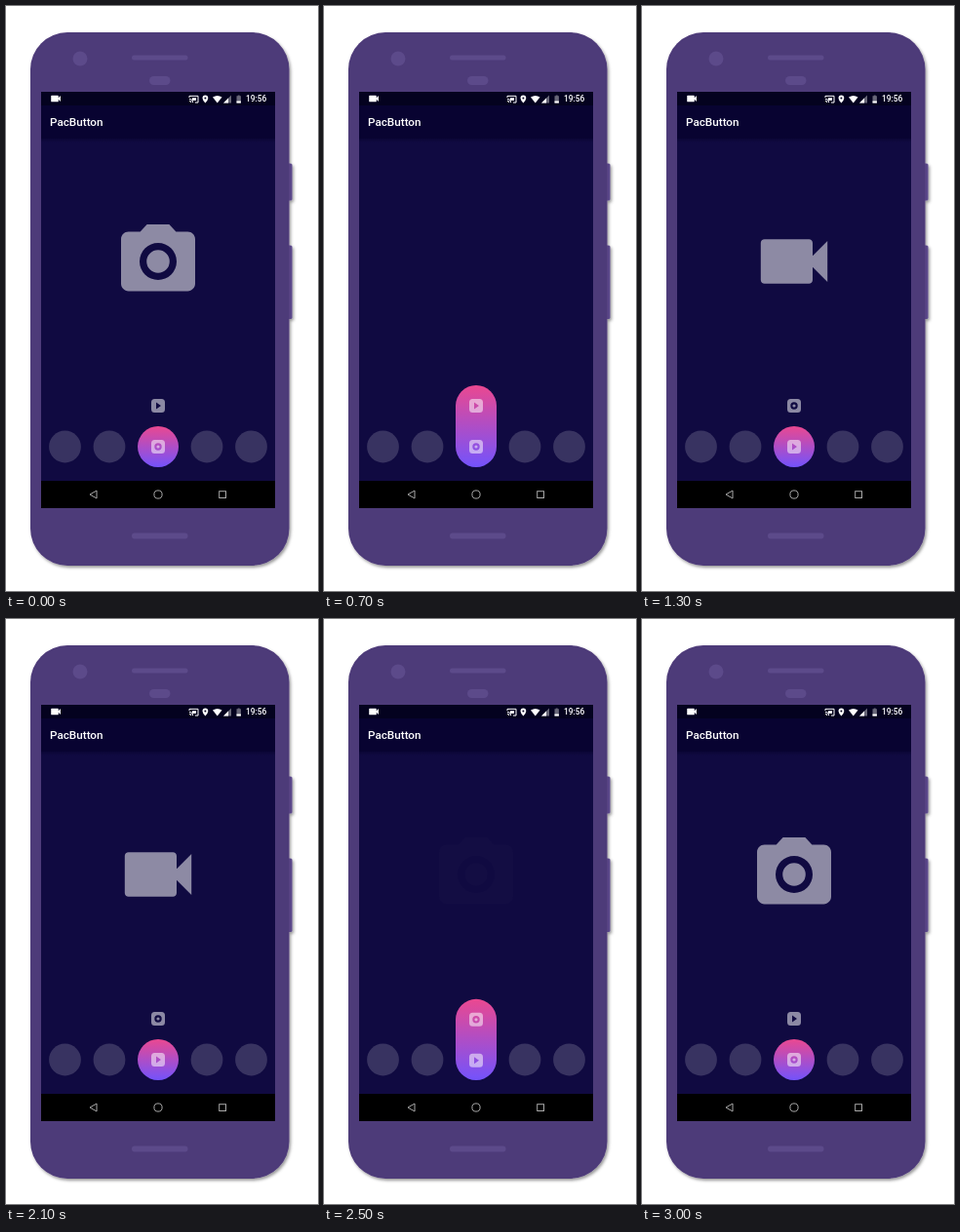
Write an HTML page that moves like this. It is 320x600 px and loops after 3700 ms.

```html
<!DOCTYPE html>
<html lang="en">
<head>
<meta charset="utf-8">
<title>PacButton</title>
<style>
  html, body { margin: 0; width: 100%; height: 100%; overflow: hidden; background: #fff; }
  svg { display: block; width: 320px; height: 600px; }
  text { font-family: Roboto, sans-serif; font-weight: 500; fill: #fff; }
  .glass { fill: #fff; fill-opacity: .52; fill-rule: evenodd; }
</style>
</head>
<body>
<svg viewBox="0 0 320 600">
  <defs>
    <linearGradient id="pink-violet" x2="0" y2="1">
      <stop stop-color="#ea4890"/><stop offset="1" stop-color="#7353fc"/>
    </linearGradient>
    <linearGradient id="bar-shadow" x2="0" y2="1">
      <stop stop-color="#050128" stop-opacity=".55"/><stop offset="1" stop-color="#050128" stop-opacity="0"/>
    </linearGradient>
    <filter id="shadow" x="-10%" y="-10%" width="120%" height="120%">
      <feDropShadow dx="1.5" dy="2" stdDeviation="1.8" flood-opacity=".4"/>
    </filter>
    <path id="camera" d="M9 2L7.17 4H4c-1.1 0-2 .9-2 2v12c0 1.1.9 2 2 2h16c1.1 0 2-.9 2-2V6c0-1.1-.9-2-2-2h-3.17L15 2H9zm3 15a5 5 0 1 1 0-10a5 5 0 1 1 0 10zm0-1.9a3.1 3.1 0 1 0 0-6.2a3.1 3.1 0 1 0 0 6.2z"/>
    <path id="video" d="M17 10.5V7c0-.55-.45-1-1-1H4c-.55 0-1 .45-1 1v10c0 .55.45 1 1 1h12c.55 0 1-.45 1-1v-3.5l4 4v-11l-4 4z"/>
    <!-- Small button icons, centred on 0,0 -->
    <path id="camera-small" d="M-3.5-7h7a3.5 3.5 0 0 1 3.5 3.5v7a3.5 3.5 0 0 1-3.5 3.5h-7a3.5 3.5 0 0 1-3.5-3.5v-7a3.5 3.5 0 0 1 3.5-3.5zM0-3.7a3.7 3.7 0 1 0 0 7.4a3.7 3.7 0 1 0 0-7.4zM0-1.6a1.6 1.6 0 1 1 0 3.2a1.6 1.6 0 1 1 0-3.2z"/>
    <path id="video-small" d="M-3.5-7h7a3.5 3.5 0 0 1 3.5 3.5v7a3.5 3.5 0 0 1-3.5 3.5h-7a3.5 3.5 0 0 1-3.5-3.5v-7a3.5 3.5 0 0 1 3.5-3.5zM-2-3.5v7l5-3.5z"/>
    <clipPath id="pill-clip"><rect class="pill" x="135" width="42" rx="21"/></clipPath>
  </defs>

  <!-- Phone -->
  <g filter="url(#shadow)">
    <g fill="#5a4789">
      <rect x="286" y="161.500" width="7.500" height="38" rx="1.500"/>
      <rect x="286" y="245.500" width="7.500" height="75.500" rx="1.500"/>
    </g>
    <rect x="25" y="27" width="265.500" height="547" rx="38" fill="#4e3a79"/>
  </g>
  <g fill="#5c4a8a">
    <circle cx="76" cy="54" r="7.500"/>
    <rect x="129" y="50.500" width="57.500" height="5" rx="2.500"/>
    <rect x="147" y="72" width="21.500" height="9" rx="4.500"/>
    <rect x="129" y="540.500" width="57.500" height="6" rx="3"/>
  </g>

  <!-- Screen -->
  <rect x="36" y="88" width="240" height="427" fill="#100a41"/>
  <rect x="36" y="135" width="240" height="5" fill="url(#bar-shadow)"/>
  <rect x="36" y="88" width="240" height="48" fill="#080331"/>
  <rect x="36" y="88" width="240" height="14" fill="#04021f"/>
  <rect x="36" y="487" width="240" height="28"/>

  <!-- Status bar -->
  <g fill="#fff">
    <use href="#video" transform="translate(44.600 88.500) scale(.54)"/>
    <path d="M201.500 94.500a2.900 2.900 0 0 1 5.800 0q0 1.900-2.900 5q-2.900-3.100-2.900-5zm1.900 0a1 1 0 1 0 2 0a1 1 0 1 0-2 0z" fill-rule="evenodd"/>
    <path d="M212 93.600q4.750-3.200 9.500 0l-4.750 5.900z"/>
    <path d="M223 99.500l8-8v8z" opacity=".4"/>
    <path d="M223 99.500l5-5v5z"/>
    <path d="M236.500 92.300h1.200v-.9h2v.9h1.200v7.200h-4.400z" opacity=".4"/>
    <path d="M236.500 97.500h4.400v2h-4.400z"/>
  </g>
  <g fill="none" stroke="#fff">
    <path d="M188 94v-1.700h9v6.700h-3M188 95.300q3.700 0 3.700 3.700M188 97.200q1.800 0 1.800 1.800"/>
    <rect x="191" y="94.200" width="4" height="2.700" fill="#fff" stroke="none"/>
  </g>
  <text x="246" y="98.300" font-size="8.400">19:56</text>
  <text x="45" y="123" font-size="11.700">PacButton</text>

  <!-- Navigation -->
  <g fill="none" stroke="#a9a9a9">
    <path d="M93 497v8l-7-4z"/>
    <circle cx="156" cy="501" r="4.100"/>
    <rect x="218.700" y="497.700" width="6.800" height="6.800"/>
  </g>

  <use id="picture" class="glass" transform="translate(110.400 216.400) scale(3.800)"/>
  <g fill="#fff" fill-opacity=".17">
    <circle cx="60.500" cy="452" r="16.400"/><circle cx="106" cy="452" r="16.400"/>
    <circle cx="206" cy="452" r="16.400"/><circle cx="251.500" cy="452" r="16.400"/>
  </g>

  <!-- Button: the waiting icon stays behind the pill, the others slide inside it -->
  <use id="waiting" class="glass" x="156" y="410"/>
  <rect class="pill" x="135" width="42" rx="21" fill="url(#pink-violet)"/>
  <g clip-path="url(#pill-clip)">
    <use id="upper" class="glass" x="156"/>
    <use id="lower" class="glass" x="156"/>
  </g>
</svg>

<script>
const LOOP = 3700, STEP = 100, FIRST_SWIPE = 400, SWIPE_GAP = 1700;
const SHRINK_START = 375, REACH = 42;
const byId = id => document.getElementById(id);
const clamp = v => Math.min(1, Math.max(0, v));
const easeOut = p => 1 - (1 - p) ** 3;
const easeInOut = p => (1 - Math.cos(Math.PI * p)) / 2;

function setIcon(id, name, y) {
  byId(id).setAttribute('href', '#' + name);
  if (y !== undefined) byId(id).setAttribute('y', y);
}

function draw(time) {
  const t = Math.floor((time % LOOP) / STEP) * STEP;
  const swipe = Math.max(0, Math.floor((t - FIRST_SWIPE) / SWIPE_GAP));
  const age = t - FIRST_SWIPE - swipe * SWIPE_GAP;
  const shrinking = age >= SHRINK_START;
  const stretch = shrinking
    ? 1 - easeInOut(clamp((age - SHRINK_START) / 280))
    : easeOut(clamp(age / 280));

  const modes = swipe % 2 ? ['video', 'camera'] : ['camera', 'video'];
  const [before, after] = modes;
  const extra = REACH * stretch;

  setIcon('picture', shrinking ? after : before);
  byId('picture').setAttribute('opacity', 1 - stretch);
  setIcon('waiting', (shrinking ? before : after) + '-small');
  const upperY = shrinking ? 452 - extra : 410;
  setIcon('upper', after + '-small', upperY);
  setIcon('lower', before + '-small', upperY + REACH);

  for (const pill of document.querySelectorAll('.pill')) {
    pill.setAttribute('y', 431 - extra);
    pill.setAttribute('height', 42 + extra);
  }
}

const start = performance.now();
function tick() {
  draw(performance.now() - start);
  requestAnimationFrame(tick);
}
tick();
</script>
</body>
</html>
```
